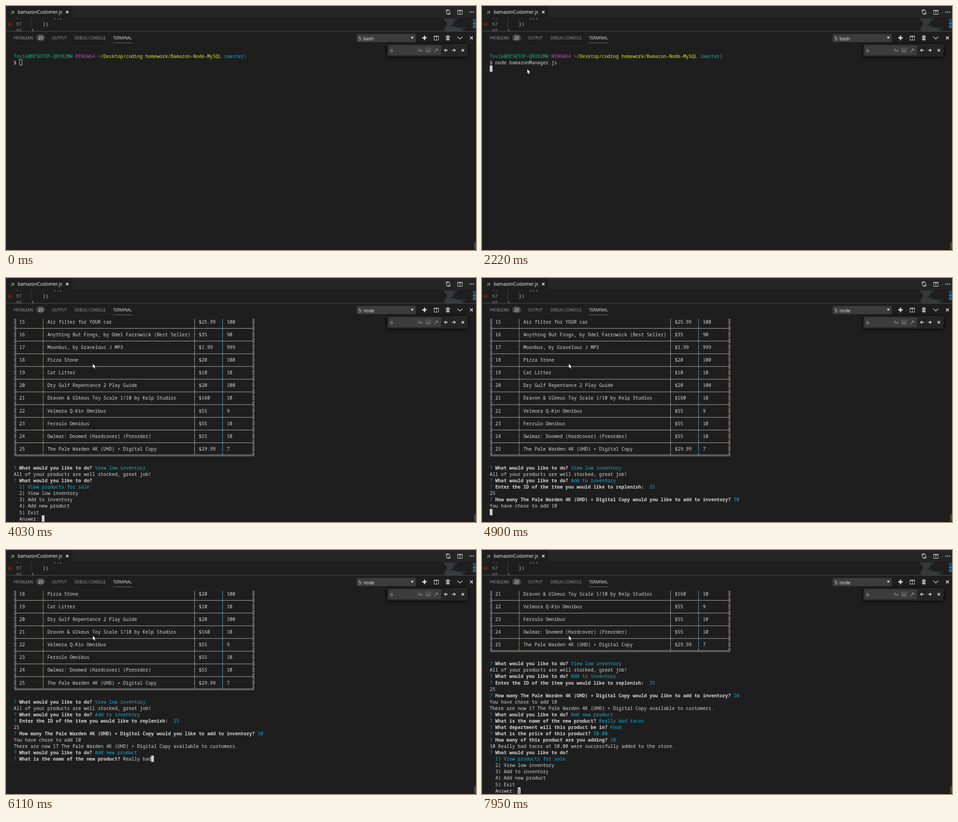
An HTML page with a canvas that plays this animation: 1036x540 px, repeating every 8 s.

```html
<!DOCTYPE html>
<html lang="en">
<head>
<meta charset="utf-8">
<title>Terminal session</title>
<style>
  html, body { margin: 0; width: 100%; height: 100%; overflow: hidden; background: #1e1e1e; }
  canvas { display: block; }
</style>
</head>
<body>
<canvas id="stage" width="1036" height="540"></canvas>
<script>
const ctx = document.getElementById('stage').getContext('2d');
const LOOP = 8000, TICK = 75.8, LEFT = 17, TOP = 89.4, CELL_W = 6.18, CELL_H = 14.06;
const MONO = '10.3px "Noto Sans Mono", monospace';
const SANS = '"Open Sans", sans-serif';
const COLORS = { w: '#d6d6d6', b: '#d6d6d6', g: '#0dbc79', c: '#16b0d6', m: '#c445c4', y: '#e8e812' };

// ---- drawing helpers ----
function rect(x, y, w, h, color) {
  ctx.fillStyle = color;
  ctx.fillRect(x, y, w, h);
}
function stroke(d, color, width = 1) {
  ctx.strokeStyle = color;
  ctx.lineWidth = width;
  ctx.stroke(new Path2D(d));
}
function fill(d, color) {
  ctx.fillStyle = color;
  ctx.fill(new Path2D(d));
}
function dot(x, y, r, color) {
  ctx.fillStyle = color;
  ctx.beginPath();
  ctx.arc(x, y, r, 0, 7);
  ctx.fill();
}
function label(text, x, y, size, color, weight = '') {
  ctx.font = `${weight} ${size}px ${SANS}`;
  ctx.fillStyle = color;
  ctx.fillText(text, x, y);
}
function mono(text, x, y, color, bold) {
  ctx.font = (bold ? 'bold ' : '500 ') + MONO;
  ctx.fillStyle = color;
  [...text].forEach((ch, i) => ch !== ' ' && ctx.fillText(ch, x + i * CELL_W, y));
}
function cross(x, y, r, width) {
  stroke(`M${x - r} ${y - r}l${2 * r} ${2 * r}m0 ${-2 * r}l${-2 * r} ${2 * r}`, '#e8e8e8', width);
}
function splitIcon(x, y) {
  stroke(`M${x + .5} ${y + .5}h10v9h-10zM${x + 5.5} ${y + .5}v9`, '#c8c8c8');
  rect(x, y, 11, 2, '#c8c8c8');
}

// ---- window frame ----
function drawEditor() {
  rect(0, 0, 1036, 540, '#1e1e1e');
  mono('96', 22, 28, '#858585');
  mono('}),', 105, 28, '#d4d4d4');
  mono('97', 22, 44, '#858585');
  mono('})', 81, 44, '#d4d4d4');
  mono('98', 22, 59, '#858585');
  mono('}', 56, 59, '#d4d4d4');
  rect(56, 27, 1, 21, '#404040');
  rect(81, 27, 1, 6, '#404040');
  dot(8, 40.5, 4, '#6f1a1a');

  let seed = 7;
  const random = () => (seed = seed * 16807 % 2147483647) / 2147483647;
  for (let y = 28; y < 55; y += 2) {
    const deep = y > 32 && y < 46;
    rect(965 + (deep ? 3 + random() * 5 : random() * 3), y, (deep ? 8 : 20) + random() * (y > 46 ? 34 : 12), .8, '#56626a');
  }
  rect(1029, 27, 7, 23, '#174a68');
  rect(1029, 38, 7, 2, '#3f7da0');
  rect(1029, 45, 7, 2, '#3f7da0');

  rect(0, 0, 1036, 27, '#252526');
  rect(0, 0, 146, 27, '#1e1e1e');
  rect(146, 27, 890, 1, '#171717');
  label('JS', 12, 16, 7.5, '#cbcb41', 'bold');
  label('bamazonCustomer.js', 26, 17, 9.9, '#ffffff');
  cross(135, 13.5, 2.6, 1.5);

  stroke('M971 10v5q0 3 4 3M978 17v-5q0-3-4-3', '#c8c8c8', 1.2);
  fill('M974 15.5l3 2.5l-3 2.5zM975 6.5l-3 2.5l3 2.5z', '#c8c8c8');
  dot(971, 9.5, 1.6, '#c8c8c8');
  dot(978, 17, 1.6, '#c8c8c8');
  splitIcon(995, 9);
  [1022.5, 1026.5, 1030.5].forEach(x => dot(x, 13.5, 1.2, '#c8c8c8'));
}

function drawPanel(shell) {
  rect(0, 56, 1036, 484, '#1e1e1e');
  rect(0, 55.5, 1036, 1.2, '#484848');
  rect(0, 28, 1, 512, '#2b2b2b');
  rect(0, 539, 1036, 1, '#171519');
  rect(1032, 523, 4, 15, '#4a4a4a');

  label('PROBLEMS', 17, 74, 8.4, '#a0a0a0');
  label('OUTPUT', 101, 74, 8.4, '#a0a0a0');
  label('DEBUG CONSOLE', 151, 74, 8.4, '#a0a0a0');
  label('TERMINAL', 236, 74, 8.6, '#e7e7e7');
  rect(236, 81, 42, 1, '#707070');
  ctx.fillStyle = '#4d4d4d';
  ctx.beginPath();
  ctx.roundRect(67, 63, 18.5, 14.5, 7.2);
  ctx.fill();
  label('23', 71.4, 73.5, 8.6, '#ffffff');

  rect(773, 62, 130, 18, '#3c3c3c');
  label(`5: ${shell}`, 777, 75.5, 10, '#f0f0f0');
  fill('M893 68h5l-2.5 5z', '#f0f0f0');

  rect(917.5, 69, 10, 3, '#d0d0d0');
  rect(921, 65.5, 3, 10, '#d0d0d0');
  splitIcon(943, 66);
  fill('M970.5 68.5h7v7.5h-7zM969.5 66.2h9v1.5h-9zM972.5 65h3v1.3h-3z', '#d0d0d0');
  stroke('M972.6 69.5v5M975.4 69.5v5', '#1e1e1e', .9);
  stroke('M995 68l5.3 5l5.3-5', '#d0d0d0', 1.4);
  cross(1026, 70.5, 3.2, 1.6);
}

function drawFindBox() {
  ctx.save();
  ctx.shadowColor = '#000';
  ctx.shadowBlur = 7;
  ctx.shadowOffsetY = 1;
  rect(840, 84, 178, 28, '#252526');
  ctx.restore();
  rect(843, 87, 116, 22, '#3c3c3c');
  label('o', 847, 102, 10, '#cccccc');
  label('Aa', 908, 101, 8.6, '#a0a0a0');
  label('Ab', 926, 101, 7.3, '#a0a0a0');
  stroke('M925.5 93.5h10.5v9h-10.5z', '#7c7c7c', .8);
  rect(945, 99.5, 2, 2, '#a0a0a0');
  stroke('M950 94v5M947.6 95.2l4.8 2.6M952.4 95.2l-4.8 2.6', '#a0a0a0');
  stroke('M974 98h-7.5m3.5-3l-3.5 3l3.5 3M983 98h7.5m-3.5-3l3.5 3l-3.5 3', '#e0e0e0', 1.3);
  cross(1007, 98, 2.7, 1.6);
}

// ---- terminal content; "§" plus a letter switches colour ----
const TODO = 'What would you like to do?';
const FILM = 'The Pale Warden 4K (UHD) + Digital Copy';
const OPTIONS = ['View products for sale', 'View low inventory', 'Add to inventory', 'Add new product', 'Exit'];
const PRODUCTS = [
  ['Wool blanket', '$30', 50],
  ['Air filter for YOUR car', '$25.99', 100],
  ['Anything But Frogs, by Odel Farrowick (Best Seller)', '$35', 90],
  ['Moonbus, by Gravelous J MP3', '$1.99', 999],
  ['Pizza Stone', '$20', 100],
  ['Cat Litter', '$10', 10],
  ['Dry Gulf Repentance 2 Play Guide', '$20', 100],
  ['Dravon & Ulkeus Toy Scale 1/10 by Kelp Studios', '$160', 10],
  ['Velmora Q-Kin Omnibus', '$55', 9],
  ['Ferrulo Omnibus', '$55', 10],
  ['Owlmar: Doomed (Hardcover) (Preorder)', '$55', 10],
  [FILM, '$29.99', 7],
];
const TABLE = PRODUCTS.flatMap(([name, price, stock], i) => [
  '║ ' + String(14 + i).padEnd(10) + name.padEnd(54) + price.padEnd(10) + stock,
  i < PRODUCTS.length - 1 ? '╟' : '╚',
]);

const ask = (question, answer, color = 'c') => `§g?§b ${question} §${color}${answer}`;
const typed = (text, from, to, k) =>
  text.slice(0, Math.max(0, Math.floor(text.length * (k - from) / (to - from))));
// Last entry whose tick has been reached
const latest = (k, steps) => steps.reduce((found, [from, value]) => k >= from ? value : found, '');

function command(k) {
  if (k < 24) return typed('node bam', 15, 22, k);
  return latest(k, [[24, 'node bamazon'], [26, 'node bamazonM'], [27, 'node bamazonManager.js']]);
}

function session(k) {
  const rows = [];
  const add = (from, ...lines) => k >= from && rows.push(...lines);
  const choose = (from, answer, done, pick) => {
    if (k < from) return;
    if (k >= done) return rows.push(ask(TODO, OPTIONS[pick - 1]));
    const active = answer || '1';
    rows.push(ask(TODO, ''),
      ...OPTIONS.map((text, i) => `§${active === String(i + 1) ? 'c' : 'w'}  ${i + 1}) ${text}`),
      '  Answer: ' + answer);
  };
  const input = (from, question, answer, done) =>
    add(from, k < done ? ask(question, answer, 'w') : ask(question, answer));

  if (k < 47) {
    rows.push('',
      '§gTovik@DESKTOP-QRV82MW §mMINGW64 §y~/Desktop/coding homework/Bamazon-Node-MySQL §c(master)',
      '$ ' + command(k));
    if (k >= 29 && k < 35) rows.push('');
    add(35, 'Congratulations, you are connected to Tresovan with management privileges!');
    choose(35, latest(k, [[41, '1'], [43, '1\\'], [46, '1']]), 47, 1);
    return rows;
  }
  rows.push(...TABLE, '');
  choose(47, latest(k, [[50, '2']]), 51, 2);
  add(51, 'All of your products are well stocked, great job!');
  choose(51, latest(k, [[55, '3']]), 57, 3);
  input(57, 'Enter the ID of the item you would like to replenish: ', typed('25', 57, 59, k), 60);
  add(60, '25');
  input(60, `How many ${FILM} would you like to add to inventory?`, typed('10', 60, 62, k), 63);
  add(63, 'You have chose to add 10');
  if (k === 63 || k === 64) rows.push('');
  add(65, `There are now 17 ${FILM} available to customers.`);
  choose(65, latest(k, [[67, '4']]), 69, 4);
  input(69, 'What is the name of the new product?', typed('Really b', 69, 77, k) + typed('ad tacos', 77, 87, k), 88);
  input(88, 'What department will this product be in?', typed('Food', 89, 93, k), 94);
  input(94, 'What is the price of this product?', typed('50.00', 94, 97, k), 98);
  input(98, 'How many of this product are you adding?', typed('10', 98, 100, k), 102);
  add(102, '10 Really bad tacos at 50.00 were successfully added to the store.');
  choose(102, latest(k, [[105, '1']]), 200, 1);
  return rows;
}

// Column, offset from its centre, colour
const RULES = [
  [0, -1.2, '#a6a6ae'], [0, 1.2, '#c4b8a8'], [10, 0, '#b8a266'], [64, 0, '#b8b4aa'],
  [74, 0, '#5aaecb'], [85, -1.2, '#b4a8a2'], [85, 1.2, '#c0b2a6'],
];

function drawGrid(y, kind) {
  const center = col => LEFT + (col + .5) * CELL_W;
  const left = center(0), right = center(85);
  const height = kind === '╚' ? 6 : 12.8;
  RULES.forEach(([col, dx, color]) => rect(center(col) + dx - .5, y + .7, 1, height, color));
  if (kind === '╟') rect(left + 1.2, y + 7.5, right - left - 2.4, 1, '#b0b0b0');
  if (kind === '╚') [6.2, 8.6].forEach(dy => rect(left - 1.7, y + dy, right - left + 3.4, 1, '#a8a8a8'));
}

function drawRow(row, y) {
  const kind = row[0];
  if ('║╟╚'.includes(kind || ' ')) {
    drawGrid(y, kind);
    row = ' ' + row.slice(1);
  }
  let col = 0;
  const base = Math.round(y + 11.3);
  (kind === '§' ? row.slice(1) : 'w' + row).split('§').forEach(part => {
    const text = part.slice(1);
    mono(text, LEFT + col * CELL_W, base, COLORS[part[0]], part[0] === 'b');
    col += text.length;
  });
  return col;
}

function drawTerminal(k) {
  const scroll = latest(k, [[0, 0], [51, 2], [65, 8], [102, 14]]);
  let col = 0, y = TOP;
  session(k).slice(scroll).forEach((row, i) => {
    y = TOP + i * CELL_H;
    col = drawRow(row, y);
  });
  if (k >= 105) col--;
  const x = LEFT + col * CELL_W;
  if (k < 12) {
    stroke(`M${x + .5} ${y + .5}h5.5v13h-5.5z`, '#cccccc');
    return;
  }
  rect(x, y, 6.2, 14, '#cccccc');
  if (k >= 105) mono('1', x, Math.round(y + 11.3), '#1e1e1e');
}

// ---- mouse: tick, x, y ----
const MOUSE = [[1, 766, 491], [11, 59, 129], [13, 57, 117], [26, 57, 117], [34, 191, 190], [200, 191, 190]];

function drawMouse(k) {
  if (k < 1) return;
  const i = MOUSE.findIndex(([tick]) => tick > k);
  const [k0, x0, y0] = MOUSE[i - 1], [k1, x1, y1] = MOUSE[i];
  const p = (k - k0) / (k1 - k0), ease = p * p * (3 - 2 * p);
  const shape = `M${x0 + .5 + (x1 - x0) * ease} ${y0 + (y1 - y0) * ease}v9l2-1.9l1.6 3.5l1.6-.7l-1.6-3.4h2.8z`;
  stroke(shape, '#101010', 1.2);
  fill(shape, '#ffffff');
}

function frame(now) {
  const k = Math.floor((now % LOOP + 14) / TICK);
  drawEditor();
  drawPanel(k < 31 ? 'bash' : 'node');
  drawTerminal(k);
  drawFindBox();
  drawMouse(k);
  requestAnimationFrame(frame);
}
requestAnimationFrame(frame);
</script>
</body>
</html>
```
